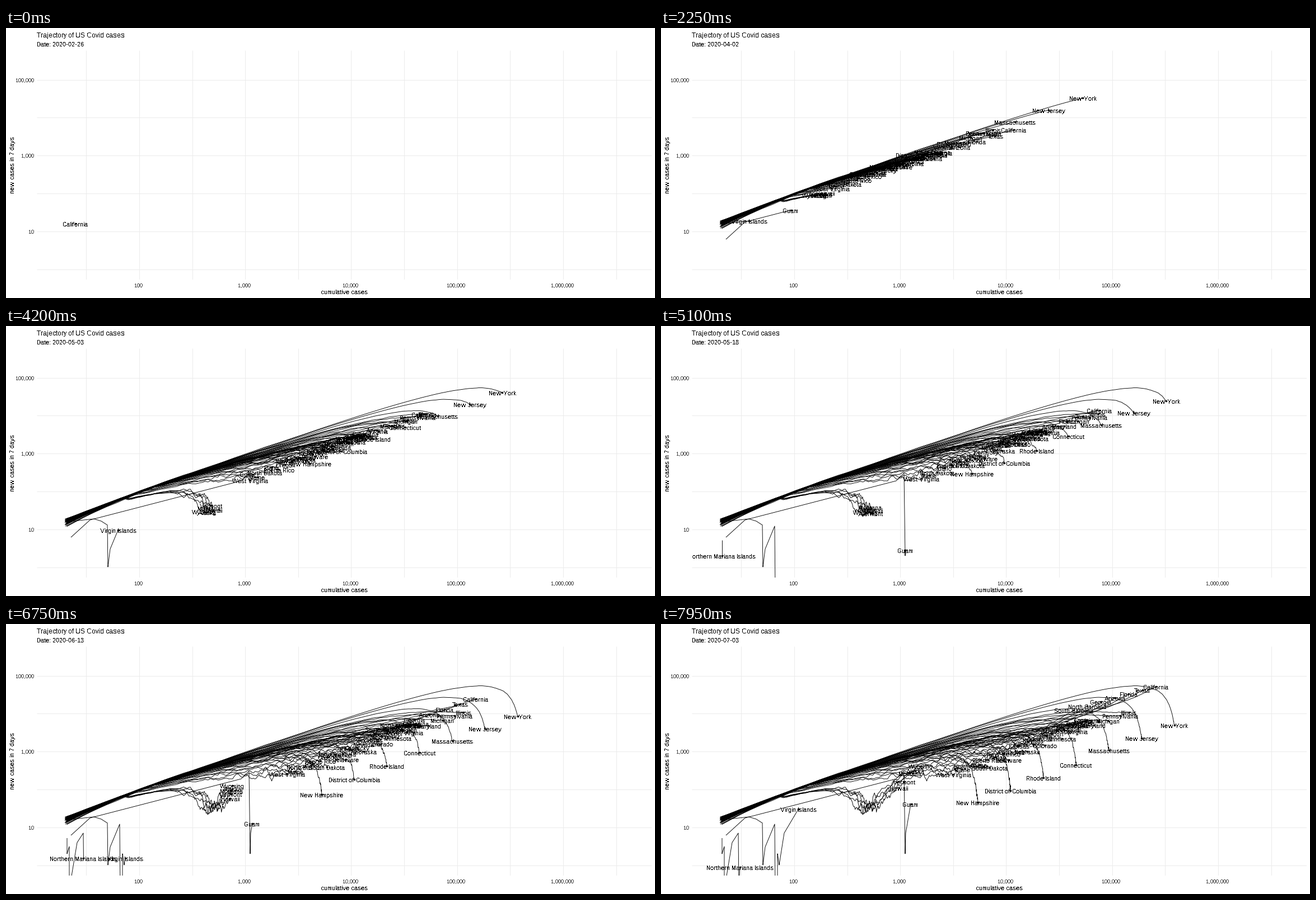
A matplotlib script that plays this animation: 1159x483 px, repeating every 8000 ms.

```python
import numpy as np
import matplotlib.pyplot as plt
from matplotlib.animation import FuncAnimation
from matplotlib.collections import LineCollection

plt.rcParams.update({
    "font.family": "Liberation Sans",
    "text.hinting": "native",
    "text.hinting_factor": 1,
    "text.antialiased": False,
})

W, H, DPI = 1159, 483, 64
LEFT, RIGHT, TOP, BOTTOM = 55, 1153, 40, 450
PX = 72 / DPI                       # points per pixel
XDEC, YDEC = 189.25, 67.8           # pixels per power of ten
STEP, LAST = 2.41, 128              # days per picture change, last day

rng = np.random.default_rng(12)
states = []


def growth(u, first, late, k, q):
    """Share of the way along the log axis: first wave, late wave, steady rise."""
    wave = (1 - np.exp(-k * u)) / (1 - np.exp(-k))
    steady = np.log1p(80 * u ** 1.2) / np.log(81)
    return first * wave + late * u ** q + (1 - first - late) * steady


def path(start, end, **shape):
    """Daily positions; the height follows from the growth over the last 7 days."""
    t = np.arange(start, LAST + 1)
    x0 = max(126 - 2 * start, 107) + rng.uniform(-2, 2)
    x = x0 + (end - x0) * growth((t - start) / (LAST - start), **shape)
    week_ago = np.r_[np.full(7, x0 - rng.uniform(70, 180)), x][:len(x)]
    share = 1 - 10 ** ((week_ago - x) / XDEC)
    y = 296 - YDEC / XDEC * (x - 237) - YDEC * np.log10(share)
    noise = np.convolve(rng.normal(size=len(t) + 2), np.ones(3) / 3, "valid")
    y += noise * np.clip((y - 150) / 25, 0.4, 8) * np.clip((t - 34) / 12, 0.2, 1)
    return np.column_stack([x, y])


def group(names, ends, starts, first, late=(0, 0), k=7, q=8, bend=1):
    """States of one shape, listed by size, spread between the two end positions."""
    names = names.split(", ")
    for name, r in zip(names, np.linspace(0, 1, len(names))):
        mix = lambda pair, w: pair[0] + (pair[1] - pair[0]) * w
        pts = path(round(mix(starts, r)), mix(ends, r ** bend),
                   first=first, late=mix(late, r), k=k, q=q)
        states.append((name, round(mix(starts, r)), pts))


def island(name, *points):
    """Straight moves between a few (day, x, y) points."""
    t, x, y = np.array(points).T
    days = np.arange(t[0], LAST + 1)
    pts = np.column_stack([np.interp(days, t, x), np.interp(days, t, y)])
    states.append((name, t[0], pts))


group("New York, New Jersey, Massachusetts, Connecticut, Rhode Island, "
      "District of Columbia, New Hampshire",
      ends=(917, 566), starts=(8, 19), first=0.95)
group("Illinois, Pennsylvania, Michigan, Maryland, Virginia, Minnesota, Colorado, "
      "Nebraska, Delaware, South Dakota",
      ends=(836, 587), starts=(13, 22), first=0.5, bend=1.25)
group("California, Texas, Florida, Arizona, Georgia, North Carolina, South Carolina",
      ends=(885, 738), starts=(0, 17), first=0.1, late=(0.03, 0.07))
group("Louisiana, Ohio, Indiana, Tennessee, Alabama, Washington, Wisconsin, Iowa, "
      "Mississippi, Missouri, Utah, Arkansas, Nevada, Kentucky, Kansas, Oklahoma, "
      "New Mexico, Oregon, Puerto Rico, Idaho, North Dakota, Maine, West Virginia",
      ends=(761, 522), starts=(14, 23), first=0.12, bend=1.5)
group("Wyoming, Alaska, Montana, Vermont, Hawaii",
      ends=(465, 425), starts=(23, 21), first=0.68, late=(0.3, 0.12), k=9, q=4)
island("Guam", (24, 116, 378), (28, 150, 347), (55, 420, 277), (70, 434, 263),
       (76, 436, 411), (99, 437, 374), (128, 446, 322))
island("Virgin Islands", (28, 112, 350), (36, 157, 345), (42, 170, 349), (49, 181, 356),
       (50, 182, 431), (55, 186, 399), (70, 203, 358), (71, 204, 475), (94, 208, 475),
       (99, 208, 411), (106, 211, 431), (118, 220, 374), (128, 246, 330))
island("Northern Mariana Islands", (70, 109, 383), (82, 109, 411), (85, 113, 398),
       (86, 113, 475), (99, 127, 391), (108, 138, 374), (109, 139, 475), (124, 139, 475),
       (128, 141, 432))

fig = plt.figure(figsize=(W / DPI, H / DPI), dpi=DPI, facecolor="white")
ax = fig.add_axes([LEFT / W, 1 - BOTTOM / H, (RIGHT - LEFT) / W, (BOTTOM - TOP) / H])
ax.set(xlim=(LEFT, RIGHT), ylim=(BOTTOM, TOP))
ax.set_autoscale_on(False)
ax.axis("off")


def label(x, y, s, px, **kw):
    return ax.text(x, y, s, fontsize=px * PX, va="baseline", **kw)


grid = dict(color="#EBEBEB", lw=PX, zorder=0)
ax.vlines(np.floor(142.8 + XDEC / 2 * np.arange(11)) + 0.5, TOP, BOTTOM, **grid)
ax.hlines(np.floor(93 + YDEC * np.arange(6)) + 0.5, LEFT, RIGHT, **grid)

label(LEFT, 17, "Trajectory of US Covid cases", 12)
date = label(LEFT, 33, "", 11)
for k in range(5):
    label(236.5 + XDEC * k, 464, f"{10 ** (k + 2):,}", 9, ha="center", color="#4D4D4D")
for k in range(3):
    label(50, 368 - 2 * YDEC * k, f"{10 ** (2 * k + 1):,}", 9, ha="right", color="#4D4D4D")
label(604, 476, "cumulative cases", 11, ha="center")
label(15, 245, "new cases in 7 days", 11, ha="center", rotation=90, rotation_mode="anchor")

trails = ax.add_collection(LineCollection([], colors="black", linewidths=0.9 * PX, zorder=2))
dots = ax.scatter([], [], s=(3.6 * PX) ** 2, c="black", linewidths=0, zorder=3)
names = [label(0, 0, s[0], 11, ha="center", clip_on=True, zorder=4) for s in states]


def update(frame):
    day = STEP * (frame // 3)
    whole = int(day)
    paths, heads = [], []
    for (_, start, pts), text in zip(states, names):
        i = whole - start
        text.set_visible(i >= 0)
        if i < 0:
            continue
        nxt = pts[min(i + 1, len(pts) - 1)]
        head = pts[i] + (day - whole) * (nxt - pts[i])
        paths.append(np.vstack([pts[:i + 1], head]))
        heads.append(head)
        text.set_position((head[0], head[1] + 5))
    trails.set_segments(paths)
    dots.set_offsets(heads)
    date.set_text(f"Date: {np.datetime64('2020-02-26') + round(day)}")
    return [trails, dots, date, *names]


anim = FuncAnimation(fig, update, frames=160, interval=50, repeat=True, repeat_delay=0)
plt.show()
```
